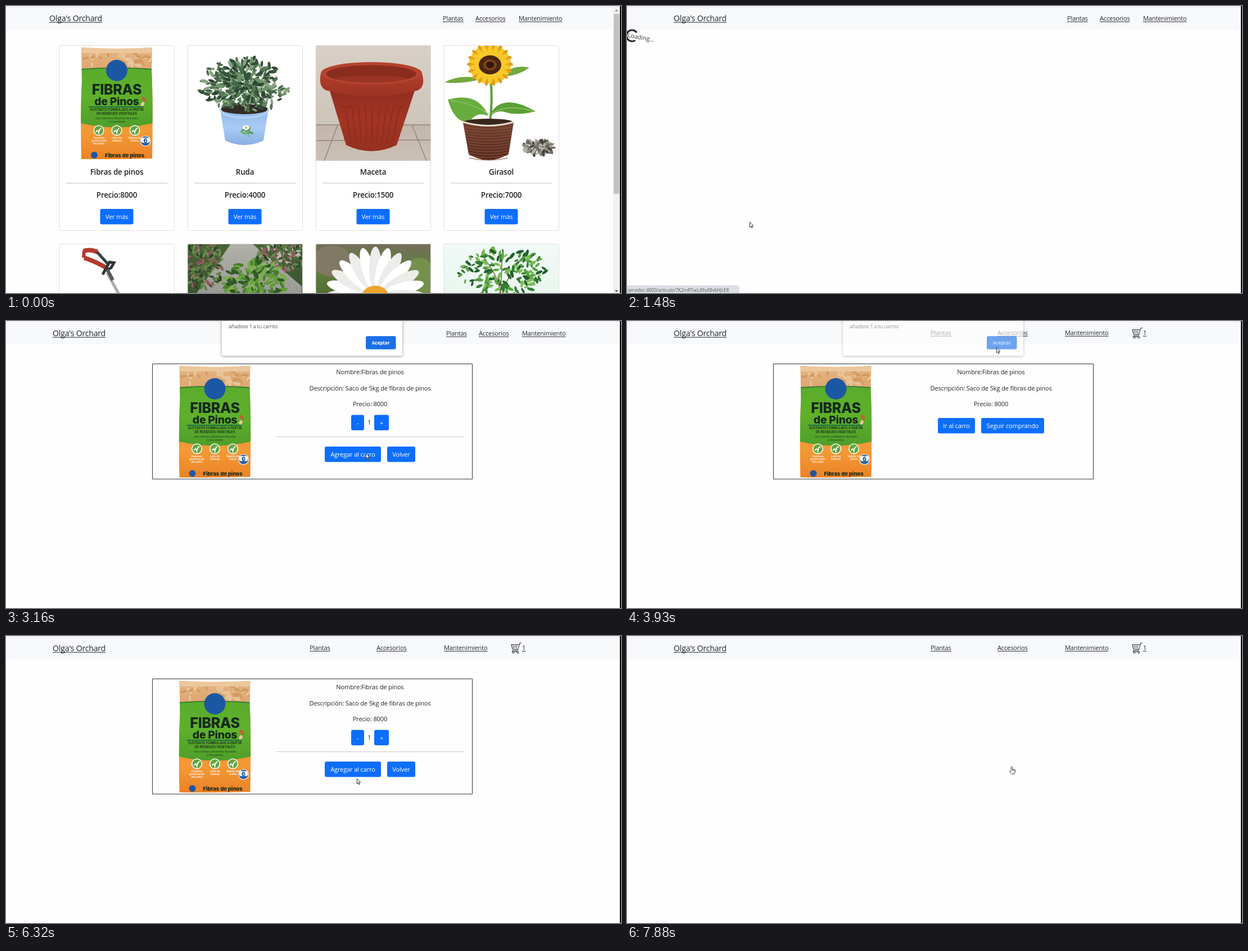
These frames come from a looping animation (1094 by 512 pixels, 8000 ms). An HTML page with a canvas:

```html
<!DOCTYPE html>
<html lang="es">
<head>
<meta charset="utf-8">
<title>Tienda</title>
<style>
html, body { margin: 0; width: 100%; height: 100%; overflow: hidden; background: #fefefe; }
canvas { display: block; }
</style>
</head>
<body>
<canvas id="stage" width="1094" height="512"></canvas>
<script>
const c = document.getElementById('stage').getContext('2d');
const LOOP = 8000, INK = '#212529', BLUE = '#0d6efd', PRODUCT = 'Fibras de pinos';
const LOADING = 1460, DETAIL = 1740, ADDED = 3890, AGAIN = 5480, LEFT = 7700;
const CLICKS = [1290, 2540, 3780, 5290, 7530];
// Pointer path: time, x, y
const PATH = [
  [250, 926, 513], [940, 221, 395], [1140, 221, 395], [1220, 218, 385], [1560, 218, 385],
  [2000, 480, 350], [2280, 644, 215], [2450, 640, 236], [3160, 640, 236], [3700, 657, 47],
  [4000, 657, 47], [4450, 648, 201], [4650, 646, 189], [5500, 646, 189], [5820, 605, 338],
  [5890, 605, 338], [6050, 545, 312], [6320, 624, 254], [6600, 645, 238], [6730, 645, 238],
  [6940, 668, 238], [7270, 668, 238], [7430, 684, 233]
];
let mouse, hand, dialog, seed;

const clamp = v => Math.max(0, Math.min(1, v));
const rnd = () => (seed = seed * 16807 % 2147483647) / 2147483647;

function rect(x, y, w, h, fill, r = 0, stroke) {
  c.beginPath();
  c.roundRect(x, y, w, h, r);
  if (fill) { c.fillStyle = fill; c.fill(); }
  if (stroke) { c.strokeStyle = stroke; c.lineWidth = 1; c.stroke(); }
}
function oval(x, y, rx, ry, fill, angle = 0) {
  c.beginPath();
  c.ellipse(x, y, rx, ry, angle, 0, 7);
  c.fillStyle = fill;
  c.fill();
}
function shape(d, fill, stroke, width = 1) {
  const p = new Path2D(d);
  if (fill) { c.fillStyle = fill; c.fill(p); }
  if (stroke) { c.strokeStyle = stroke; c.lineWidth = width; c.stroke(p); }
}
function text(s, x, y, size = 11.5, o = {}) {
  c.font = `${o.weight || 400} ${size * .965}px ${o.font || '"Open Sans", "Noto Sans"'}, sans-serif`;
  c.letterSpacing = -size * .013 + 'px';
  c.textAlign = o.align || 'center';
  c.fillStyle = o.color || INK;
  c.fillText(s, x, y);
  if (o.line) c.fillRect(x, y + 1.6, c.measureText(s).width, 1);
}
function fade(y0, y1, ...colors) {
  const g = c.createLinearGradient(0, y0, 0, y1);
  colors.forEach((col, i) => g.addColorStop(i / (colors.length - 1), col));
  return g;
}
function button(x, y, w, label) {
  const over = !dialog && mouse.x >= x && mouse.x <= x + w && mouse.y >= y && mouse.y <= y + 27.5;
  if (over) hand = true;
  rect(x, y, w, 27.5, over ? '#0b5ed7' : BLUE, 3);
  text(label, x + w / 2, y + 18, 11.5, { color: '#fff' });
}
function foliage(cx, cy, rx, ry, n, size, colors) {
  seed = cx * 31 + n;
  for (let i = 0; i < n; i++) {
    const a = rnd() * 6.283, d = Math.sqrt(rnd()), l = size * (.6 + rnd() * .6);
    oval(cx + Math.cos(a) * d * rx, cy + Math.sin(a) * d * ry, l, l * .4,
      colors[i % colors.length], a + rnd() * 2 - 1);
  }
}

function bag(x, y) {
  c.save();
  c.translate(x, y);
  c.clip(new Path2D('M1 0Q64 4 127 0L126 40Q129 100 127 198Q64 200 1 199Q-1 120 2 60Z'));
  rect(0, 0, 128, 200, fade(0, 200, '#e3b584', '#dda269', '#f08b2c', '#f39a37', '#ec8225'));
  foliage(64, 22, 62, 14, 30, 7, ['#d49a60', '#e8c498']);
  rect(0, 0, 128, 10, '#ecc79b');
  shape('M0 39Q64 34 128 39V135Q64 150 0 135Z', fade(38, 140, '#5aac2c', '#5fb02a', '#4f9f2a'));
  shape('M0 39Q64 34 128 39', null, '#2f7d35', 2);
  oval(64, 41, 19, 19, '#1c57a3');
  const bold = { weight: 800, font: 'Inter', color: '#15291b' };
  text('FIBRAS', 64, 84, 26, bold);
  text('de Pinos', 64, 103, 20, bold);
  oval(112, 92, 5, 3, '#c85f36', 1);
  oval(110, 101, 4, 3, '#e4c79b', 2);
  rect(14, 105, 98, 2, '#1b7040');
  text('SUSTRATO FORMULADO A PARTIR', 64, 113, 6, { ...bold, weight: 600 });
  text('DE RESIDUOS VEGETALES', 64, 119.5, 6, { ...bold, weight: 600 });
  text('Usos: Siembra y Resiembra de prados', 64, 128, 4.6, { color: '#173d1b' });
  text('y otras plantas', 64, 134, 4.6, { color: '#173d1b' });
  [['Favorece', 'germinación', 'del pasto'], ['Libre de', 'malezas'], ['Mejora los', 'suelos']].forEach((rows, i) => {
    const cx = 32 + i * 32;
    oval(cx, 148, 9.5, 9.5, '#fff');
    oval(cx, 148, 8, 8, '#63a83d');
    shape(`M${cx - 5} 151Q${cx - 2} 145 ${cx} 152Q${cx + 1} 145 ${cx + 5} 144`, null, '#fff', 2);
    rows.forEach((s, k) => text(s, cx, 163 + k * 5.2, 4.8, { color: '#fff', weight: 600 }));
  });
  oval(115, 167, 9.5, 9.5, '#fff');
  oval(115, 167, 8.5, 8.5, '#2a62a5');
  rect(107, 161, 16, 9, '#fff', 4);
  text('6', 115, 169.5, 11, { ...bold, color: '#1c4f90' });
  oval(24, 192, 6, 6, '#1c57a3');
  text(PRODUCT, 78, 196, 10, bold);
  c.restore();
}

function rue() {
  const greens = ['#35523a', '#557a55', '#6f936a', '#46684a', '#2c4630', '#86a37f'];
  foliage(422, 142, 79, 48, 170, 6.5, greens);
  foliage(422, 140, 56, 42, 190, 7, greens);
  shape('M381 184Q424 202 467 184L458 240Q424 256 390 240Z', fade(184, 250, '#8fb8ea', '#a9cbf5', '#86aee2'));
  oval(424, 184, 42, 9, '#332c26');
  shape('M381 184Q384 198 424 199Q464 198 467 184', null, '#b4d2f7', 3.5);
  foliage(424, 174, 40, 13, 45, 6, greens);
  foliage(429, 225, 9, 7, 14, 4, ['#4d9553', '#79b477']);
  oval(427, 217, 6, 4, '#fff');
  oval(427, 217, 2, 2, '#e3a33b');
}

function pot() {
  rect(551, 70, 205, 145, fade(70, 215, '#d8d0c7', '#cdc4b9'));
  rect(551, 212, 205, 64, fade(212, 276, '#c2b6a9', '#cbc1b6'));
  shape('M551 212H756M551 240L756 239M590 212L566 276M722 212L748 276', null, '#948478', 1.5);
  shape('M574 145L605 248Q650 270 695 248L729 145Z', fade(145, 262, '#8f2c1e', '#a43524', '#94301f'));
  for (let i = 0; i < 9; i++)
    shape(`M${592 + i * 15} 182Q${600 + i * 13} 173 ${604 + i * 12} 184L${614 + i * 9} 246`, null, '#8a2a1c', 1.5);
  shape('M560 120Q554 150 577 152Q650 170 727 152Q748 148 740 120Z', fade(120, 160, '#b23e2c', '#9c3322'));
  oval(650, 120, 90, 20, '#b5432f');
  oval(650, 121, 80, 15.5, '#8a2d1f');
  oval(650, 130, 62, 5.5, '#9a3424');
}

function sunflower() {
  shape('M862 130Q866 170 861 206', null, '#5f9e35', 4);
  shape('M834 128Q806 123 780 136Q804 140 840 132M885 118Q910 104 931 110Q912 124 889 125', '#72a83c');
  shape('M858 196Q840 152 786 167Q798 210 825 207Q836 187 858 196', '#67ad3e');
  shape('M863 190Q885 155 942 188Q910 196 890 190Q875 184 863 195', '#5aa036');
  shape('M859 193Q828 172 790 169M864 191Q895 174 938 188', null, '#a0cf73', 1.2);
  for (let k = 0; k < 2; k++)
    for (let i = 0; i < 18; i++) {
      const a = (i + k / 2) * .349, r = 27 - k * 3;
      oval(861 + Math.cos(a) * r, 104 + Math.sin(a) * r * .92, 14, 4.5, k ? '#f8c828' : '#e2a015', a);
    }
  oval(861, 105, 20, 17, '#4c2610');
  oval(861, 105, 12, 10, '#7a4319');
  oval(861, 105, 7, 6, '#32180a');
  shape('M813 208H903L894 264Q858 286 823 264Z', fade(205, 275, '#75412f', '#57291d'));
  for (let y = 216; y < 272; y += 5)
    shape(`M${816 + (y - 216) * .14} ${y}Q858 ${y + 8} ${900 - (y - 216) * .14} ${y}`, null, '#8b5743', 1.2);
  oval(858, 207, 44, 6, '#39261d');
  shape('M813 207Q858 220 903 207', null, '#e3dcd3', 3);
  foliage(948, 251, 29, 13, 90, 6, ['#6d6a62', '#b5b2aa', '#45423c', '#8f8b82']);
}

function trimmer() {
  shape('M180 476L204 520', null, '#a8abad', 5);
  shape('M138 437Q150 433 163 439M139 449Q160 456 180 468', null, '#b53a2b', 8);
  shape('M139 436L138 449', null, '#b53a2b', 6);
  shape('M162 439L183 462', null, '#3b3f40', 5);
  shape('M172 479L184 457L192 458L187 467L178 472', null, '#303637', 5);
  shape('M180 470L190 489', null, '#555b5c', 6);
}

function nursery() {
  rect(323, 424, 205, 90, fade(424, 512, '#4a6138', '#3c5530'));
  shape('M400 424H438L526 500V514H338Z', fade(424, 512, '#b0b1a9', '#999b94'));
  foliage(350, 462, 36, 46, 150, 5, ['#587a3f', '#2c4527', '#6f8c50', '#8f5a5c']);
  foliage(492, 446, 44, 25, 150, 5, ['#527440', '#2a4527', '#6d8a50', '#9c5968', '#bdb9a8']);
  foliage(442, 493, 54, 40, 150, 8, ['#477e2c', '#649a3c', '#2f5a22', '#7dad50']);
}

function daisy() {
  rect(551, 424, 205, 90, fade(424, 512, '#736e58', '#647c42', '#537133'));
  oval(580, 455, 34, 28, '#817963');
  oval(735, 485, 30, 36, '#73904d');
  for (let i = 0; i < 13; i++) {
    const a = Math.PI + i * .262;
    oval(657 + Math.cos(a) * 51, 517 + Math.sin(a) * 50, 38, 11, i % 2 ? '#fff' : '#ececea', a);
  }
  oval(657, 518, 24, 19, '#eda42b');
}

function ficus() {
  rect(779, 424, 205, 90, fade(424, 512, '#f1faf6', '#e9f6ef'));
  shape('M880 515Q876 480 850 450M882 515Q894 475 921 448M880 512L883 440', null, '#80664b', 1.5);
  foliage(884, 475, 78, 44, 165, 6, ['#347b32', '#58a342', '#22602b', '#7bba58']);
}

function card(x, y, photo, name, price) {
  c.save();
  c.beginPath();
  c.roundRect(x, y, 205, 331, 3);
  c.clip();
  rect(x, y, 205, 331, '#fff');
  photo();
  c.restore();
  rect(x, y + .5, 204.5, 330, null, 3, '#dfdfdf');
  if (!name) return;
  const mid = x + 102;
  text(name, mid, 301, 13.9, { weight: 600 });
  rect(x + 12, 315.5, 180, 1, '#bdbdbd');
  text('Precio:' + price, mid, 342, 13.9, { weight: 600 });
  button(mid - 29.5, 362, 59, 'Ver más');
}

function home() {
  card(95, 70, () => bag(133, 74), PRODUCT, 8000);
  card(323, 70, rue, 'Ruda', 4000);
  card(551, 70, pot, 'Maceta', 1500);
  card(779, 70, sunflower, 'Girasol', 7000);
  [trimmer, nursery, daisy, ficus].forEach((photo, i) => card(95 + i * 228, 424, photo));
  rect(1080, 2, 12, 510, '#f1f1f1');
  rect(1081, 14, 10, 321, '#c1c1c1');
  shape('M1083 9.5L1086 6L1089 9.5Z', '#8a8a8a');
  shape('M1083 507L1086 510.5L1089 507Z', '#505050');
}

function navbar(shift, cart) {
  rect(0, 0, 1092, 41.5, '#f8f9fb');
  rect(0, 0, 1092, 1, '#fff');
  rect(0, 1, 1092, 1, '#e1e3e6');
  const link = { align: 'left', line: true };
  text("Olga's Orchard", 83 + shift, 27, 14.6, link);
  const xs = cart ? [540, 659, 779] : [783, 841, 918];
  ['Plantas', 'Accesorios', 'Mantenimiento'].forEach((s, i) =>
    text(s, xs[i] + shift, cart ? 25 : 26, 11.5, link));
  if (!cart) return;
  shape('M917 12.5H914L910 26H901M898.5 15.5H912.5M899 15.5L901 23.5H910M902.5 17V21.5M905.5 17V21.5M908.5 17V21.5M901 26L900 28H912', null, INK);
  [902.5, 910.5].forEach(x => shape(`M${x - 1.5} 29.5a1.5 1.5 0 1 0 3 0a1.5 1.5 0 1 0 -3 0`, '#fff', INK));
  text('1', 918, 25, 11.5, link);
}

function detail(added) {
  rect(260.5, 76.5, 569, 205.5, '#fefefe', 0, '#333');
  bag(307.5, 80);
  text('Nombre:' + PRODUCT, 647.5, 95);
  text('Descripción: Saco de 5kg de ' + PRODUCT.toLowerCase(), 647.5, 123.5);
  text('Precio: 8000', 647.5, 152);
  if (added) {
    button(553, 173, 66, 'Ir al carro');
    button(630, 173, 112, 'Seguir comprando');
    return;
  }
  button(614, 167.5, 23, '-');
  text('1', 646, 184.5);
  button(655, 167.5, 26, '+');
  rect(480, 206, 335, 1, '#cacaca');
  button(567, 224, 100, 'Agregar al carro');
  button(678, 224, 50, 'Volver');
}

function spinner(t) {
  c.save();
  c.translate(9, 53);
  c.rotate((t - LOADING) / 750 * 2 * Math.PI);
  c.beginPath();
  c.arc(0, 0, 10, Math.PI / 4, Math.PI * 7 / 4);
  c.strokeStyle = INK;
  c.lineWidth = 3;
  c.stroke();
  text('Loading...', -8, 4, 11.5, { align: 'left', color: '#444' });
  c.restore();
}

function alertBox(alpha) {
  c.save();
  c.globalAlpha = alpha;
  // The shadow falls only outside, so the fading panel stays white
  c.save();
  c.clip(new Path2D('M0 0H1094V512H0ZM384 0H705V58Q705 62 701 62H388Q384 62 384 58Z'), 'evenodd');
  c.shadowColor = 'rgba(0,0,0,.4)';
  c.shadowBlur = 5;
  c.shadowOffsetY = 1;
  rect(384, -40, 321, 102, '#fff', 4);
  c.restore();
  rect(384, -40, 321, 102, '#fff', 4);
  text('añadiste 1 a tu carrito', 396, 12.5, 9.2, { align: 'left', color: '#50545a' });
  rect(640, 27, 53.5, 23.5, '#1a6fe8', 3);
  text('Aceptar', 666.5, 42, 8.6, { color: '#fff', weight: 700 });
  c.restore();
}

function pointerAt(t) {
  const i = PATH.findIndex(k => k[0] > t);
  if (i === 0) return { x: -99, y: -99 };
  const b = PATH[i < 0 ? PATH.length - 1 : i], a = i < 0 ? b : PATH[i - 1];
  const u = clamp((t - a[0]) / (b[0] - a[0] || 1)), e = u * u * (3 - 2 * u);
  return { x: a[1] + (b[1] - a[1]) * e, y: a[2] + (b[2] - a[2]) * e };
}

function pointer(t) {
  c.save();
  c.translate(mouse.x, mouse.y);
  if (CLICKS.some(k => t >= k && t < k + 120)) oval(0, 0, 8.5, 8.5, 'rgba(222,200,40,.75)');
  c.lineJoin = 'round';
  if (hand) shape('M-.8 7V.6Q.3-1 1.4.6V4.6L5.5 5.4Q7 5.8 6.7 8L5.4 13H-.2L-3.4 8.5Q-3.2 6.6-.8 8.6M1.4 4.6V7M3.4 5V7M5.3 5.4V7.4', '#fff', '#333', .9);
  else shape('M.4.4V9.6L2.5 7.7L4 11L5.4 10.4L4 7.2H6.7Z', '#fff', '#222', .9);
  c.restore();
}

function draw(now) {
  const t = now % LOOP, atHome = t < LOADING, cart = t >= ADDED;
  mouse = pointerAt(t);
  dialog = t < 4000 ? clamp((t - 2690) / 220) * clamp((4000 - t) / 110) : 0;
  hand = t >= LEFT;
  rect(0, 0, 1094, 512, '#fefefe');
  navbar(atHome ? -6 : 0, cart);
  if (atHome) home();
  else if (t < DETAIL) spinner(t);
  else if (t < LEFT) detail(cart && t < AGAIN);
  if (t > 1200 && t < DETAIL) {
    rect(-4, 499, 203, 17, '#dee1e6', 3, '#cfd2d6');
    text('servidor:4000/articulo/7K2mRTwLd9s4Bv6HJcE8', 1, 510, 8.6, { align: 'left', color: '#555a60' });
  }
  if (dialog) alertBox(dialog);
  pointer(t);
  rect(1092, 0, 2, 512, '#000');
  requestAnimationFrame(draw);
}
requestAnimationFrame(draw);
</script>
</body>
</html>
```
